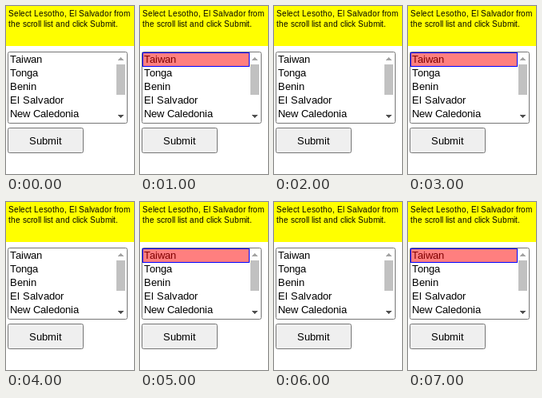
Recreate the animation shown at these times as an HTML page with a canvas. Size 160x210 px, loop 8000 ms.

```html
<!DOCTYPE html>
<html lang="en">
<head>
<meta charset="utf-8">
<title>Scroll list</title>
<style>
  html, body { margin: 0; width: 100%; height: 100%; overflow: hidden; background: #fff; }
  canvas { display: block; }
</style>
</head>
<body>
<canvas id="stage" width="160" height="210"></canvas>
<script>
  const LOOP = 8000;
  const STEP = 1000;
  const OPTIONS = ["Taiwan", "Tonga", "Benin", "El Salvador", "New Caledonia"];
  const ROW_HEIGHT = 17;
  const ctx = document.getElementById("stage").getContext("2d");

  function rect(x, y, w, h, color) {
    ctx.fillStyle = color;
    ctx.fillRect(x, y, w, h);
  }

  function frame(x, y, w, h, fill, stroke, radius) {
    ctx.beginPath();
    ctx.roundRect(x + 0.5, y + 0.5, w - 1, h - 1, radius);
    ctx.fillStyle = fill;
    ctx.fill();
    ctx.strokeStyle = stroke;
    ctx.stroke();
  }

  // Letters advance by whole pixels, kerning included.
  function text(string, x, y, size) {
    ctx.font = `${size}px "Liberation Sans", Arial, sans-serif`;
    ctx.fillStyle = "#000";
    const width = s => ctx.measureText(s).width;
    for (let i = 0; i < string.length; i++) {
      const letter = string[i];
      const next = string[i + 1] || "";
      ctx.fillText(letter, x, y);
      const kerning = width(letter + next) - width(letter) - width(next);
      x += Math.round(width(letter)) + Math.round(kerning);
    }
  }

  // Stepped triangle; direction 1 widens downwards, -1 upwards.
  function arrow(x, tipY, direction, color) {
    for (let row = 0; row < 4; row++) {
      rect(x - row, tipY + direction * row, 2 * row + 1, 1, color);
    }
  }

  function drawQuery() {
    rect(0, 0, 160, 50, "#ff0");
    text("Select Lesotho, El Salvador from", 3, 13, 10);
    text("the scroll list and click Submit.", 3, 26, 10);
  }

  function drawList() {
    frame(2, 57, 150, 90, "#fff", "#767676", 2);
    OPTIONS.forEach((name, i) => text(name, 5, 71 + i * ROW_HEIGHT, 13));
    rect(138, 73, 11, 38, "#c1c1c1");
    arrow(143, 64, 1, "#a3a3a3");
    arrow(143, 139, -1, "#505050");
  }

  function drawHighlight() {
    rect(4, 59, 132, 16, "rgba(255, 0, 0, .5)");
    ctx.strokeStyle = "#00f";
    ctx.strokeRect(3.5, 58.5, 133, 17);
  }

  function drawButton() {
    frame(2, 152, 95, 32, "#efefef", "#767676", 2);
    text("Submit", 29, 173, 13);
  }

  const start = performance.now();

  // The first option is marked during every second step.
  function draw(now) {
    const time = Math.max(0, now - start) % LOOP;
    rect(0, 0, 160, 210, "#fff");
    drawQuery();
    drawList();
    if (Math.floor(time / STEP) % 2 === 1) drawHighlight();
    drawButton();
    requestAnimationFrame(draw);
  }
  draw(start);
</script>
</body>
</html>
```
